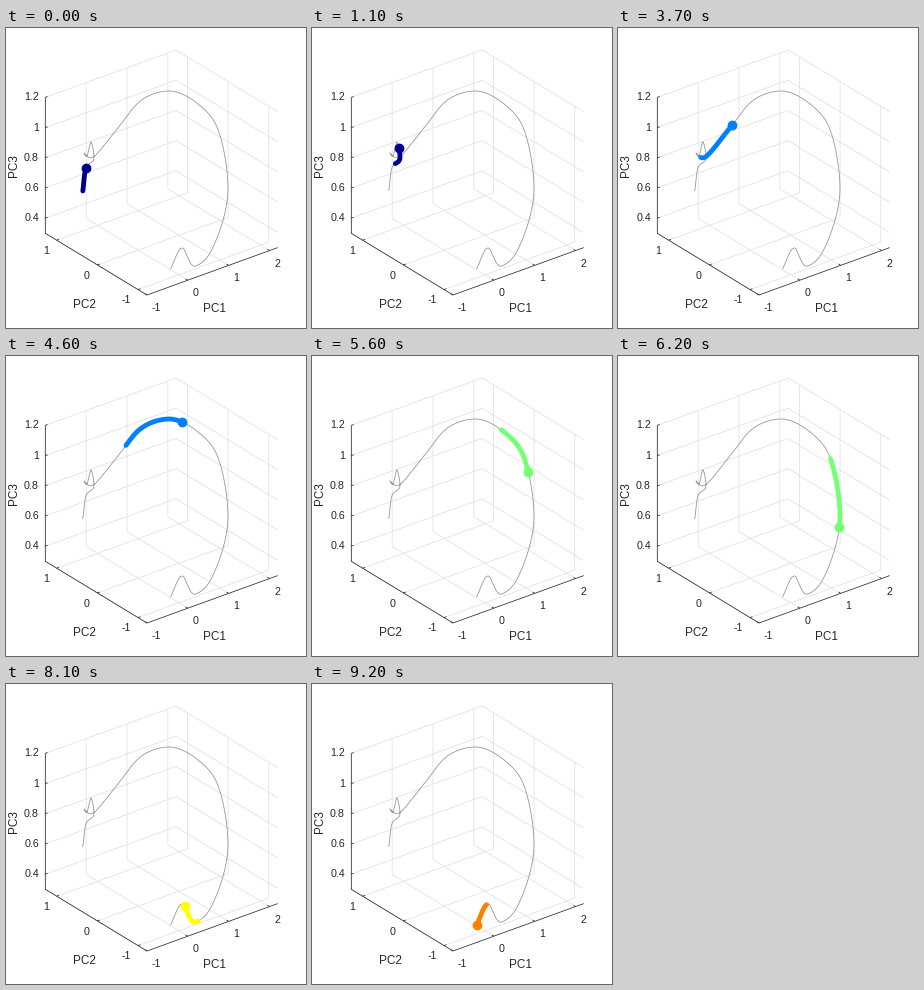
A matplotlib script for the animation above (9300 ms loop, 300 px wide and 300 px high).

```python
import numpy as np
import matplotlib.pyplot as plt
from matplotlib.animation import FuncAnimation

SIZE, DPI = 300, 100
FRAMES, INTERVAL = 93, 100
LAG = 8          # frames covered by the trail
PX = 72 / DPI    # one pixel in points
INK = "0.15"

plt.rcParams["font.family"] = "Liberation Sans"

# Screen positions of the floor corners; heights go straight up.
LEFT = np.array([39.3, 205.3])
FRONT = np.array([141, 267])
RIGHT = np.array([271.7, 219.6])
PC1, PC2, PC3 = (-1, 2.2), (-1.22, 1.28), (0.3, 1.2)
UNIT1 = (RIGHT - FRONT) / (PC1[1] - PC1[0])
UNIT2 = (LEFT - FRONT) / (PC2[1] - PC2[0])
UNIT3 = np.array([0, -151])


def project(a, b, c):
    return (FRONT + (a - PC1[0]) * UNIT1 + (b - PC2[0]) * UNIT2
            + (c - PC3[0]) * UNIT3)


# Turning points of the trajectory: frame, x, y
TURNS = np.array([
    (-LAG, 76.8, 163), (0, 80, 139.7), (8, 88, 129.5), (13, 85.5, 114.5),
    (22, 80.3, 128.3), (25, 78, 125), (31, 88, 128.5), (37, 114, 97.3),
    (40, 133, 74), (44, 162, 63), (50, 200, 83), (56, 216.3, 116),
    (61, 222, 162), (69, 204, 225), (74, 190, 238), (83, 176, 220),
    (92, 164.5, 241),
])

# First frame of each phase with its colour
PHASES = [(0, (0, 0, 0.56)), (30, (0, 0.5, 1)), (47, (0.46, 1, 0.46)),
          (63, (1, 1, 0)), (86, (1, 0.5, 0))]


def head_at(t):
    """Smooth path through the turning points (cubic Hermite)."""
    times, pts = TURNS[:, 0], TURNS[:, 1:]
    slopes = np.gradient(pts, times, axis=0)
    i = np.clip(np.searchsorted(times, t, "right") - 1, 0, len(times) - 2)
    h = (times[i + 1] - times[i])[:, None]
    u = (t - times[i])[:, None] / h
    ease = u * u * (3 - 2 * u)
    return (pts[i] + ease * (pts[i + 1] - pts[i])
            + h * u * (1 - u) * ((1 - u) * slopes[i] - u * slopes[i + 1]))


fig = plt.figure(figsize=(SIZE / DPI, SIZE / DPI), dpi=DPI, facecolor="white")
ax = fig.add_axes([0, 0, 1, 1])
ax.set_xlim(0, SIZE)
ax.set_ylim(SIZE, 0)
ax.axis("off")


def draw(*points, color=INK, width=0.75):
    xs, ys = zip(*points)
    ax.plot(xs, ys, color=color, lw=width * PX, solid_capstyle="butt")


def label(x, y, text, size=10.67, ha="center", va="center_baseline", **kw):
    ax.text(x, y, text, fontsize=size * PX, ha=ha, va=va, color=INK, **kw)


def grid(*corners):
    draw(*(project(*c) for c in corners), color="0.87", width=0.7)


def tick(start, direction):
    draw(start, start + 2.5 * direction / np.hypot(*direction))


def axis_title(x, y, text, **kw):
    label(x, y, text, size=11.73, **kw)


near1, far1 = PC1
near2, far2 = PC2
low, high = PC3

for a in range(-1, 3):
    grid((a, near2, low), (a, far2, low), (a, far2, high))
    p = project(a, near2, low)
    tick(p, UNIT2)
    label(p[0] + 4.5, p[1] + 12, str(a), ha="left")
for b in range(-1, 2):
    grid((near1, b, low), (far1, b, low), (far1, b, high))
    p = project(near1, b, low)
    tick(p, UNIT1)
    label(p[0] - 7.5, p[1] + 9.7, str(b), ha="right")
for c in np.arange(2, 7) / 5:
    grid((near1, far2, c), (far1, far2, c), (far1, near2, c))
    p = project(near1, far2, c)
    tick(p, UNIT1)
    label(33, p[1] - 1, f"{c:g}", ha="right")

draw(project(near1, far2, high), LEFT, FRONT, RIGHT)
axis_title(208.5, 279.5, "PC1")
axis_title(78.5, 275.5, "PC2")
axis_title(7.5, 137.5, "PC3", rotation=90, va="center")

draw(*head_at(np.linspace(-LAG, FRAMES - 1, 600)), color="0.58", width=0.8)
trail, = ax.plot([], [], lw=4.8 * PX, solid_capstyle="round",
                 solid_joinstyle="round")
head, = ax.plot([], [], "o", ms=9.8 * PX, mew=0)


def update(frame):
    color = [c for start, c in PHASES if start <= frame][-1]
    path = head_at(np.linspace(frame - LAG, frame, 50))
    trail.set_data(*path.T)
    head.set_data(*path[-1:].T)
    trail.set_color(color)
    head.set_color(color)
    return trail, head


anim = FuncAnimation(fig, update, frames=FRAMES, interval=INTERVAL,
                     repeat=True, repeat_delay=0, blit=False)
plt.show()
```
